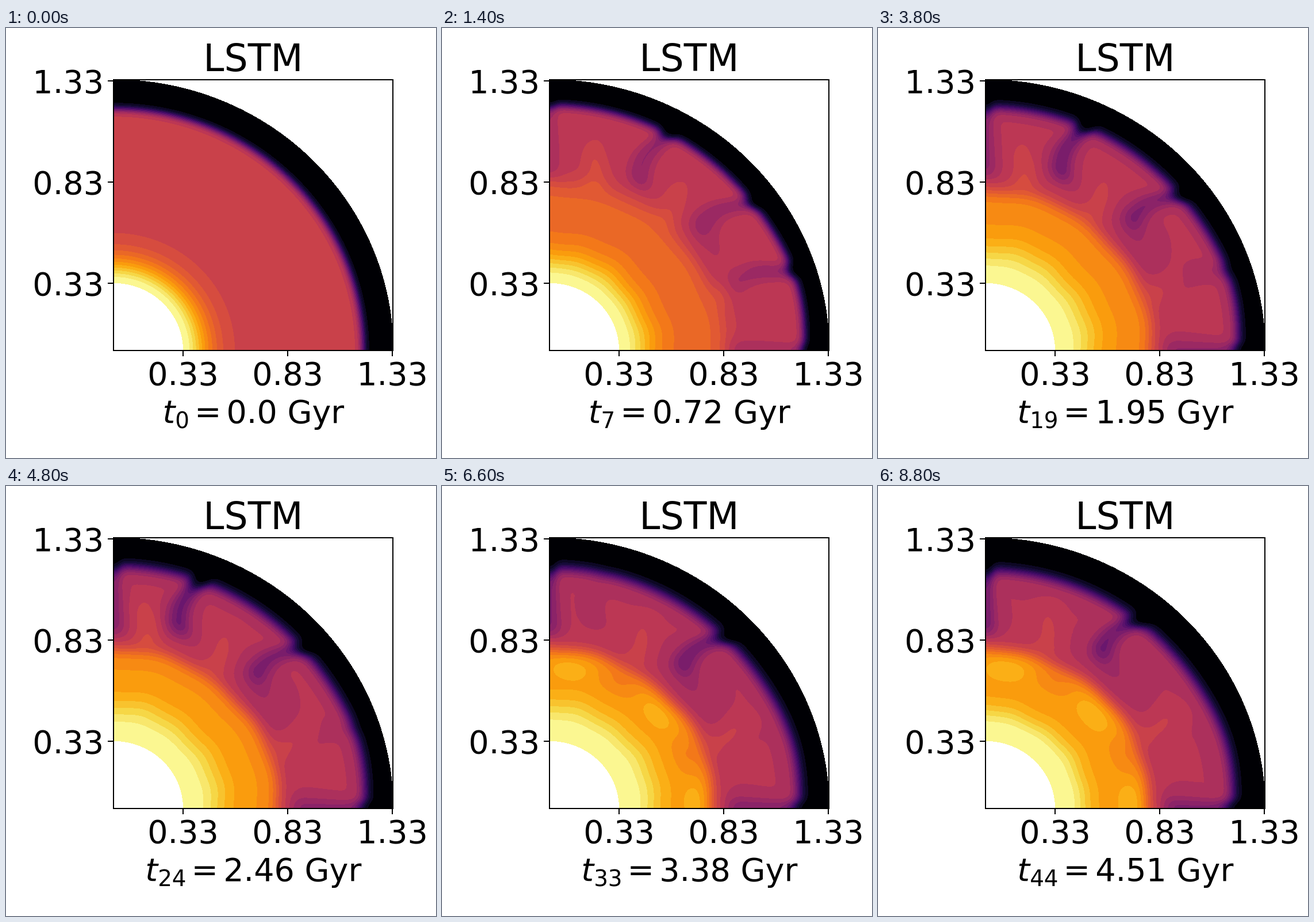
Animation of 748 by 748 pixels, one loop 9000 ms. Source, as an HTML page with a canvas:

```html
<!DOCTYPE html>
<html lang="en">
<head>
<meta charset="utf-8">
<title>Mantle temperature</title>
<style>
  html, body { margin: 0; width: 100%; height: 100%; overflow: hidden; background: #fff; }
  canvas { display: block; }
</style>
</head>
<body>
<canvas id="stage" width="748" height="748"></canvas>
<script>
const ctx = document.getElementById('stage').getContext('2d');

const STEP_MS = 200, STEPS = 45, GYR_PER_STEP = 0.10249;
const BOX = { x: 187, y: 90, w: 486, h: 471 };
const INNER = 121, OUTER = 487, MARGIN = 1, ASPECT = 1.0326;
const FONT = '"DejaVu Sans", sans-serif';
const SIZE = 55.56, TITLE_SIZE = 65;

const lerp = (a, b, u) => a + (b - a) * u;
const clamp01 = v => Math.max(0, Math.min(1, v));
const smooth = (a, b, v) => { const u = clamp01((v - a) / (b - a)); return u * u * (3 - 2 * u); };
const logistic = v => 1 / (1 + Math.exp(-v));
const bell = v => Math.exp(-v * v);
const decay = (step, time) => Math.exp(-step / time);

// Inferno colours, sampled at the middle of each of 25 bands.
const STOPS = '000004 160b39 420a68 6a176e 932667 bc3754 dd513a f37819 fca50a f6d746 fcffa4'
  .split(' ').map(hex => [0, 2, 4].map(i => parseInt(hex.slice(i, i + 2), 16)));
const BANDS = Array.from({ length: 25 }, (_, i) => {
  const pos = (i + 0.5) / 25 * 10, k = Math.floor(pos);
  return STOPS[k].map((v, c) => Math.round(lerp(v, STOPS[k + 1][c], pos - k)));
});
BANDS[0] = STOPS[0];

// Mean temperature by radius: a hot core, a warming plateau and a cooler mantle above its rim.
function meanProfile(step) {
  const mantle = 48 + 6 * decay(step, 8);
  const plateau = 54 + 25 * (1 - decay(step, 11));
  const rim = 285 + 45 * decay(step, 7), blur = 8 + 6 * decay(step, 10);
  const coreWidth = 46 + 25 * Math.sin(Math.PI * step / 52), sharpness = 1.7 + step / 30;
  return radius => {
    const core = Math.exp(-Math.pow(Math.max(0, radius - INNER) / coreWidth, sharpness));
    const base = lerp(mantle, plateau, logistic((rim - radius) / blur));
    return lerp(base, 100, core);
  };
}

// Sinks drift towards the vertical axis; each rise stands midway between two sinks.
function currents(step) {
  const grown = 1 - decay(step, 4);
  const upper = 27.5 - 0.0145 * step * step;
  const middle = 52 - 0.0075 * step * step;
  const upperLife = 1 - smooth(25, 34, step);
  const sink = (angle, strength, options) =>
    ({ angle, strength: -strength * grown, width: 18, tilt: 0, low: 335, high: 600, ...options });
  const rise = (a, b, strength) =>
    ({ angle: (a + b) / 2, strength: strength * grown, width: 17, tilt: 0, low: 270, high: 375 });
  return [
    sink(0, 6 + 0.2 * step, { width: 15, low: 315 }),
    sink(upper, (11 + 0.25 * step) * upperLife),
    sink(middle, 10 + 0.12 * step, { tilt: 3 }),
    sink(middle + 5, 4, { width: 42, low: 290, high: 365 }),
    sink(70, 14 * bell(step / 16)),
    sink(90, 6 + 0.16 * step, { width: 16, low: 315 }),
    rise(0, upper, 7 * upperLife),
    rise(upper, middle, 5),
    rise(middle, 90, 4.5)
  ];
}

function flowAt(list, radius, angle) {
  const height = (radius - 300) / 130;
  const sway = 1.2 * Math.sin(radius / 22);
  let sum = 0;
  for (const c of list) {
    const center = c.angle - c.tilt * (1 - height) + (c.angle % 90 ? sway : 0);
    const offset = (angle - center) * radius * Math.PI / 180;
    const lateral = offset / (c.width * (1.5 - 0.6 * height));
    if (Math.abs(lateral) > 2.6) continue;
    const reach = smooth(c.low - 25, c.low + 20, radius) * (1 - smooth(c.high - 35, c.high + 35, radius));
    sum += c.strength * bell(lateral) * reach;
  }
  return sum * smooth(280, 315, radius);
}

const image = ctx.createImageData(BOX.w, BOX.h);

function paintField(step) {
  const mean = meanProfile(step), list = currents(step);
  const lid = 434 + 10 * (1 - decay(step, 3)) - 0.36 * step;
  const softness = lerp(4.3, 6.5, smooth(4, 30, step));
  const ripple = Math.min(1, step / 7), tongues = 5 * smooth(25, 33, step);
  const profile = Array.from({ length: OUTER + 10 }, (_, r) => mean(r));

  function heatAt(radius, angle) {
    const turn = angle * Math.PI / 180;
    const wave = ripple * (2 * Math.sin(7 * turn + step * 0.1) + 1.2 * Math.sin(17 * turn));
    const at = Math.max(INNER, radius + wave * smooth(125, 200, radius)), k = Math.floor(at);
    const flow = radius > 280 ? flowAt(list, radius, angle) : 0;
    const tongue = tongues * Math.cos(9 * turn - 1.4 * Math.PI) * bell((radius - 255) / 22);
    const edge = lid + ripple * 6 * bell((angle - 75) / 14) + 0.8 * Math.min(0, flow);
    return (lerp(profile[k], profile[k + 1], at - k) + flow - tongue) * logistic((edge - radius) / softness);
  }

  const data = image.data;
  data.fill(255);
  for (let j = MARGIN; j < BOX.h; j++) {
    const up = (BOX.h - j - 0.5) * ASPECT;
    for (let i = 0; i < BOX.w - MARGIN; i++) {
      const right = i + 0.5, radius = Math.hypot(right, up);
      if (radius < INNER || radius > OUTER) continue;
      const heat = heatAt(radius, Math.atan2(right, up) * 180 / Math.PI);
      const color = BANDS[Math.max(0, Math.min(24, Math.floor(heat / 4)))];
      const o = (j * BOX.w + i) * 4;
      data[o] = color[0];
      data[o + 1] = color[1];
      data[o + 2] = color[2];
    }
  }
  ctx.putImageData(image, BOX.x, BOX.y);
}

function text(value, x, y, align = 'left', size = SIZE, style = '') {
  ctx.font = `${style} ${size}px ${FONT}`;
  ctx.textAlign = align;
  ctx.fillText(value, x, y);
}

function paintAxes() {
  ctx.fillStyle = '#000';
  ctx.strokeStyle = '#000';
  ctx.lineWidth = 2;
  ctx.strokeRect(BOX.x, BOX.y, BOX.w, BOX.h);
  text('LSTM', 430, 74.5, 'center', TITLE_SIZE);
  ['0.33', '0.83', '1.33'].forEach((label, i) => {
    const x = 308 + 182 * i, y = 444 - 176 * i;
    ctx.fillRect(x - 1, 562, 2, 9);
    ctx.fillRect(177, y - 1, 9, 2);
    text(label, x, 621, 'center');
    text(label, 170, y + 20.5, 'right');
  });
}

function paintCaption(step) {
  const rounded = Number((step * GYR_PER_STEP).toFixed(2));
  const time = Number.isInteger(rounded) ? rounded.toFixed(1) : String(rounded);
  const gap = 9, baseline = 687;
  const parts = [
    ['t', baseline, SIZE, 'italic', 0],
    [String(step), baseline + 9, SIZE * 0.7, '', gap],
    ['=', baseline, SIZE, '', gap],
    [`${time} Gyr`, baseline, SIZE, '', 0]
  ];
  const widths = parts.map(([value, , size, style, after]) => {
    ctx.font = `${style} ${size}px ${FONT}`;
    return ctx.measureText(value).width + after;
  });
  let x = 430.3 - widths.reduce((a, b) => a + b) / 2;
  parts.forEach(([value, y, size, style], i) => {
    text(value, x, y, 'left', size, style);
    x += widths[i];
  });
}

let shown = -1;
function tick() {
  const step = Math.floor(performance.now() / STEP_MS) % STEPS;
  if (step !== shown) {
    shown = step;
    ctx.fillStyle = '#fff';
    ctx.fillRect(0, 0, 748, 748);
    paintField(step);
    paintAxes();
    paintCaption(step);
  }
  requestAnimationFrame(tick);
}
tick();
</script>
</body>
</html>
```
